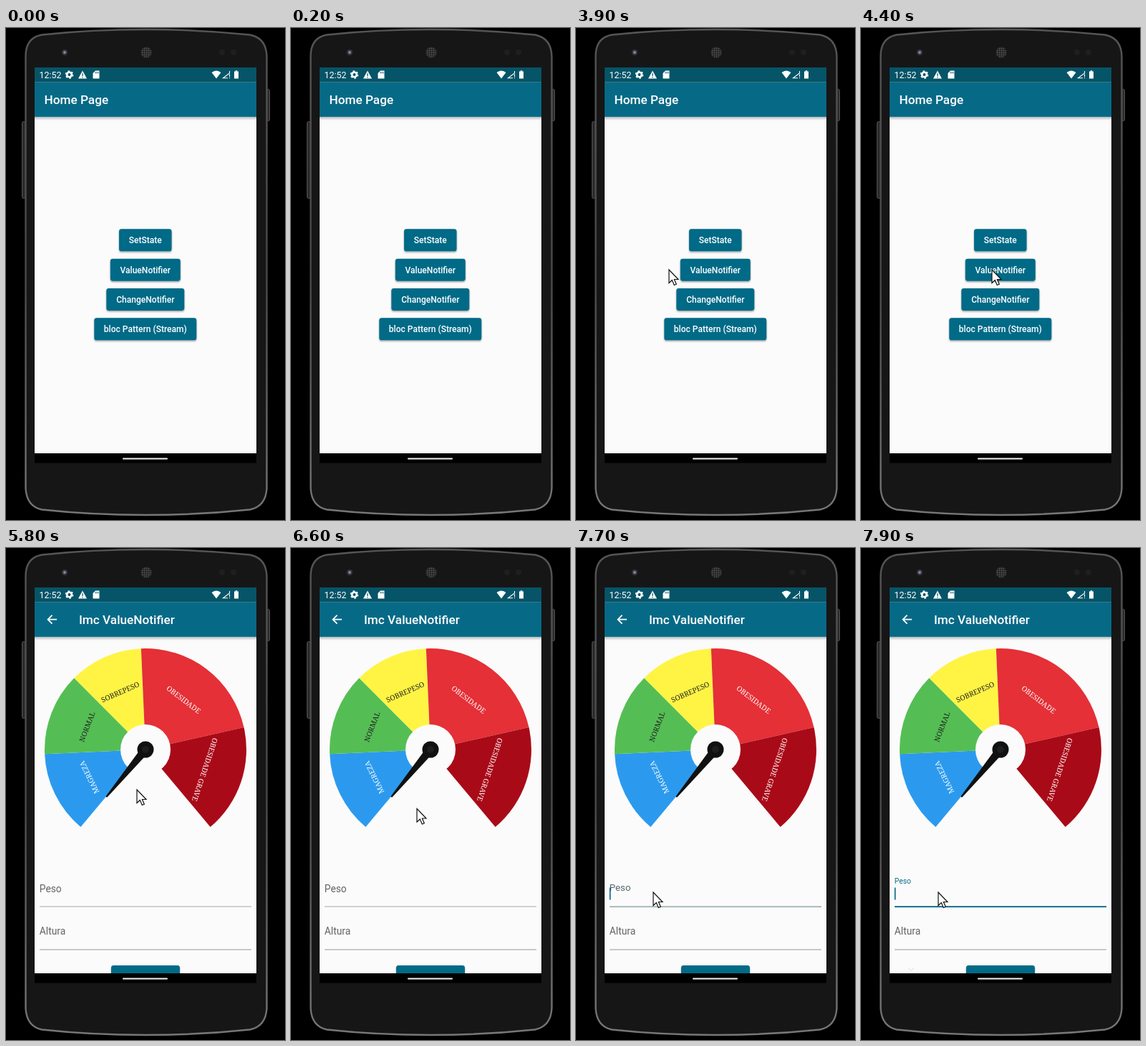
Write an HTML page that moves like this. It is 390 px wide and 686 px high and loops after 8000 ms.

```html
<!DOCTYPE html>
<html lang="pt">
<head>
<meta charset="utf-8">
<title>Phone demo</title>
<style>
html, body { margin: 0; width: 100%; height: 100%; overflow: hidden; background: #000 }
svg { display: block; width: 390px; height: 686px; font-family: Roboto, sans-serif }
.title { font-size: 17.2px; font-weight: 500; fill: #fff }
.button { font-size: 12.05px; font-weight: 500; fill: #fff; text-anchor: middle }
.slice { font-family: "Noto Serif", serif; font-size: 10px; text-anchor: middle }
.field { font-size: 13.8px; fill: #646464 }
</style>
</head>
<body>
<svg viewBox="0 0 390 686">
  <defs>
    <linearGradient id="rim" x2="0" y2="1">
      <stop offset="0" stop-color="#555"/>
      <stop offset=".5" stop-color="#484848"/>
      <stop offset="1" stop-color="#777"/>
    </linearGradient>
    <linearGradient id="fade" x2="0" y2="1">
      <stop offset="0" stop-opacity=".25"/>
      <stop offset="1" stop-opacity="0"/>
    </linearGradient>
    <pattern id="mesh" width="3" height="3" patternUnits="userSpaceOnUse">
      <rect width="3" height="3" fill="#222"/>
      <circle cx="1.5" cy="1.5" r="1" fill="#555"/>
    </pattern>
    <filter id="drop" x="-10%" y="-20%" width="120%" height="160%">
      <feDropShadow dx="0" dy="1.4" stdDeviation="1" flood-opacity=".4"/>
    </filter>
    <clipPath id="screen"><rect x="40" y="55" width="310" height="538"/></clipPath>
  </defs>

  <!-- phone body -->
  <g fill="#2a2a2a" stroke="#555">
    <rect x="22.500" y="130.500" width="5" height="107" rx="2"/>
    <rect x="363.500" y="85.500" width="5" height="44" rx="2"/>
  </g>
  <path d="M27.500 40Q27 14 50 9.500Q120 2 195 2T341 9.500Q364 14 364.500 40V642Q363 667 341 671.500Q270 679 195 679T50 671.500Q29 667 27.500 642Z"
        fill="#161616" stroke="url(#rim)" stroke-width="2.400"/>
  <circle cx="82" cy="34" r="4.200" fill="#33333a"/>
  <circle cx="82" cy="34" r="2" fill="#85859a"/>
  <circle cx="196" cy="34" r="7.500" fill="url(#mesh)"/>
  <circle cx="302" cy="34" r="4" fill="#1f1f1f"/>
  <circle cx="318" cy="34" r="4" fill="#1f1f1f"/>
  <rect x="40" y="593" width="310" height="13.500"/>
  <rect x="163" y="599.600" width="63" height="2" rx="1" fill="#f4f4f4"/>

  <g clip-path="url(#screen)">
    <rect x="40" y="55" width="310" height="538" fill="#fbfbfb"/>
    <rect x="40" y="124" width="310" height="5" fill="url(#fade)"/>
    <rect x="40" y="75.700" width="310" height="48.200" fill="#066a87"/>
    <rect x="40" y="55" width="310" height="20.700" fill="#065468"/>

    <!-- status bar -->
    <g fill="#fff">
      <text x="46.500" y="69.500" font-size="12.400">12:52</text>
      <circle cx="88.500" cy="65" r="3.300" fill="none" stroke="#fff" stroke-width="2.600"/>
      <circle cx="88.500" cy="65" r="5" fill="none" stroke="#fff" stroke-width="1.600" stroke-dasharray="2.600 2.636"/>
      <path d="M107 59.500L113 70.500H101Z"/>
      <path d="M107 63.300V67M107 68V69.300" stroke="#065468" stroke-width="1.300"/>
      <path d="M125 59.500H130.500V70.500H121.500V63Z"/>
      <path d="M125 61V63.500M127 61V63.500M129 61V63.500" stroke="#065468" stroke-width=".9"/>
      <path d="M287.500 62Q294 57 300.500 62L294 70.500Z"/>
      <path d="M312.500 60V63L303.500 69.800H310M312.500 64.500V68M312.500 69V70.300" fill="none" stroke="#fff" stroke-width="1.100"/>
      <path d="M319 60.500H320.800V59.300H323.200V60.500H325V70.500H319Z"/>
    </g>

    <g id="home"><text class="title" x="53.500" y="106">Home Page</text></g>

    <g id="imc">
      <path d="M71 99.700H58.500M64.500 93.700L58.500 99.700L64.500 105.700" fill="none" stroke="#fff" stroke-width="1.700"/>
      <text class="title" x="102" y="106">Imc ValueNotifier</text>
      <g id="gauge"></g>
      <circle cx="195" cy="281" r="35" fill="#fbfbfb"/>
      <path d="M190.400 277.200L139.700 346Q139.500 348 141.500 347.500L199.600 284.800Z" fill="#111"/>
      <circle cx="195" cy="281" r="11.500" fill="#111"/>
      <circle cx="195" cy="281" r="5" fill="#1c1e20"/>
      <text id="peso" class="field">Peso</text>
      <rect id="line" x="47" y="499.200" width="296"/>
      <rect id="caret" x="46.800" y="473.500" width="1.700" height="17" fill="#066a87"/>
      <text class="field" x="46.800" y="539">Altura</text>
      <rect x="47" y="559.400" width="296" height="1.200" fill="#aaa"/>
      <rect x="147" y="582" width="96" height="31" rx="3.400" fill="#066a87" filter="url(#drop)"/>
      <path id="chevron" d="M65.500 585L70 589.500L74.500 585" fill="none" stroke="#ddd"/>
    </g>

    <path id="pointer" d="M0 0V18.500L4.300 14.500L7.300 21.500L10.300 20.200L7.400 13.500H13Z" fill="#fff" stroke="#111" stroke-width="1.200"/>
  </g>
</svg>
<script>
const $ = id => document.getElementById(id);

function add(parent, tag, attrs, text = '') {
  const el = document.createElementNS('http://www.w3.org/2000/svg', tag);
  for (const k in attrs) el.setAttribute(k, attrs[k]);
  el.textContent = text;
  parent.append(el);
}

// home buttons: label, width
[['SetState', 73.5], ['ValueNotifier', 98], ['ChangeNotifier', 109], ['bloc Pattern (Stream)', 143]]
  .forEach(([label, width], i) => {
    const y = 280.3 + i * 41.33;
    add($('home'), 'rect', { x: 194.8 - width / 2, y, width, height: 31, rx: 3.4, fill: '#066a87', filter: 'url(#drop)' });
    add($('home'), 'text', { class: 'button', x: 194.8, y: y + 20 }, label);
  });

// gauge slices: label, end angle, fill, text colour
const polar = (deg, r) => {
  const a = deg * Math.PI / 180;
  return [195 + r * Math.cos(a), 281 + r * Math.sin(a)];
};
let start = 130;
for (const [label, end, fill, ink] of [
  ['MAGREZA', 177.5, '#2b9aee', '#fff'],
  ['NORMAL', 225, '#54be54', '#222'],
  ['SOBREPESO', 267.5, '#fff444', '#222'],
  ['OBESIDADE', 347.3, '#e43036', '#fff'],
  ['OBESIDADE GRAVE', 410, '#a90a18', '#fff']
]) {
  const mid = (start + end) / 2;
  add($('gauge'), 'path', { d: `M195 281L${polar(start, 141)}A141 141 0 0 1 ${polar(end, 141)}Z`, fill });
  add($('gauge'), 'text', {
    class: 'slice', fill: ink, y: 3.5,
    transform: `translate(${polar(mid, 87.5)}) rotate(${mid + 90})`
  }, label);
  start = end;
}

// pointer path: time, x, y
const path = [
  [3700, 106, 386], [3900, 130, 337], [4100, 160, 303], [4300, 186, 329], [4400, 183, 337],
  [6500, 183, 337], [6700, 169, 390], [6900, 147, 460], [7100, 130.5, 493], [7400, 108, 480], [8000, 108, 480]
];
function pointerAt(t) {
  const i = path.findIndex(p => p[0] > t);
  const [t0, x0, y0] = path[i - 1], [t1, x1, y1] = path[i];
  const k = (t - t0) / (t1 - t0);
  return [mix(x0, x1, k), mix(y0, y1, k)];
}

const mix = (a, b, k) => a + (b - a) * k;
const mixRgb = (from, to, k) => `rgb(${from.map((c, i) => mix(c, to[i], k))})`;
const show = (id, on) => $(id).style.display = on ? '' : 'none';
const teal = [6, 106, 135];
const begin = performance.now();

function draw() {
  const t = Math.floor((performance.now() - begin) % 8000 / 100) * 100;
  show('home', t < 5800);
  show('imc', t >= 5800);
  show('pointer', t >= 3700);
  if (t >= 3700) $('pointer').setAttribute('transform', `translate(${pointerAt(t)})`);

  // field focus: label floats up, underline thickens
  const p = Math.max(0, Math.min(1, (t - 7650) / 200));
  const k = p * p * (3 - 2 * p);
  $('peso').setAttribute('transform', `translate(46.8 ${mix(479.5, 468, k)}) scale(${mix(1, .75, k)})`);
  $('peso').style.fill = mixRgb([100, 100, 100], teal, k);
  $('line').setAttribute('height', p ? 1.9 : 1.5);
  $('line').style.fill = mixRgb([196, 196, 196], teal, k);
  show('caret', p > 0);
  show('chevron', t >= 7900);
  requestAnimationFrame(draw);
}
draw();
</script>
</body>
</html>
```
